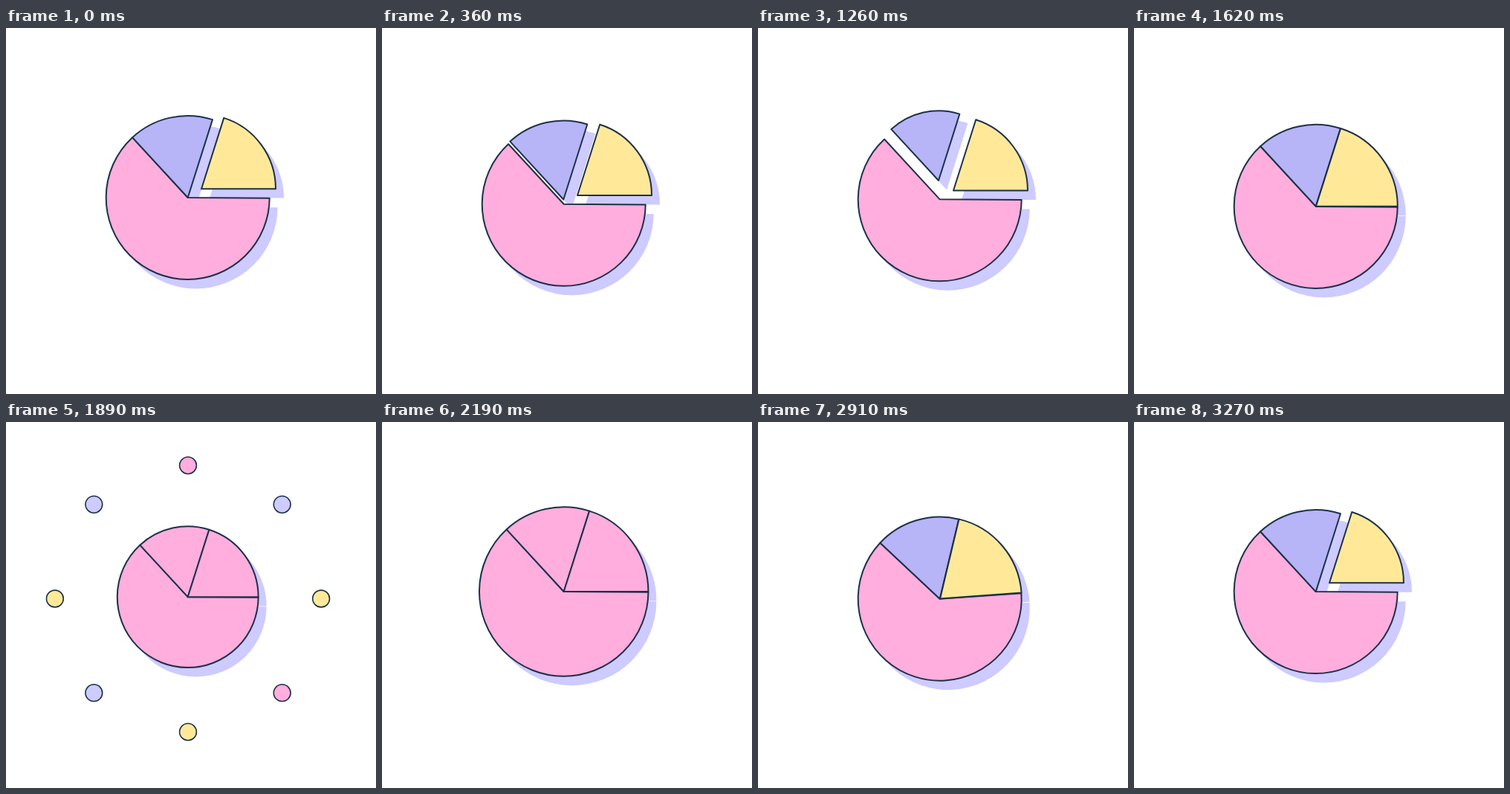
Write an HTML page with a canvas that moves like this. It is 498 px wide and 492 px high and loops after 3300 ms.

```html
<!DOCTYPE html>
<html lang="en">
<head>
<meta charset="utf-8">
<title>Pie chart</title>
<style>
  html, body { margin: 0; width: 100%; height: 100%; overflow: hidden; background: #fff; }
  canvas { display: block; }
</style>
</head>
<body>
<canvas id="stage" width="498" height="492"></canvas>
<script>
const ctx = document.getElementById('stage').getContext('2d');
const LOOP = 3300, STEP = 30, CX = 244.7, RADIUS = 110;
const INK = '#1d3148', SHADOW = '#cdcbff';
const PINK = [255, 174, 222], VIOLET = [183, 180, 248], YELLOW = [255, 233, 153];
const rgb = c => `rgb(${c.map(Math.round)})`;
const mix = (a, b, p) => a + (b - a) * p;
const rad = deg => deg * Math.PI / 180;
const smooth = p => (1 - Math.cos(Math.PI * p)) / 2;

// Eased value between [time, value] pairs
function track(t, keys) {
  if (t <= keys[0][0]) return keys[0][1];
  for (let i = 1; i < keys.length; i++) {
    const [t0, a] = keys[i - 1], [t1, b] = keys[i];
    if (t < t1) return mix(a, b, smooth((t - t0) / (t1 - t0)));
  }
  return keys[keys.length - 1][1];
}

const merge = [[1640, 0], [1900, 1], [2580, 1], [2830, 0]];
const size = [[1620, 1], [1860, 0.86], [2220, 1.037], [2430, 1]];
const swing = [[2190, 0], [2460, 23], [2880, -4.5], [3060, 0]];

// dx, dy and shrink apply when a slice is fully pulled out
const slices = [
  { from: 0.4, to: 227.3, color: PINK, dx: 0, dy: 0, shrink: 1, out: [[0, 0]] },
  { from: 227.3, to: 287.6, color: VIOLET, dx: -1.7, dy: -25.3, shrink: 0.853,
    out: [[240, 0], [600, 1], [1350, 1], [1640, 0]] },
  { from: 287.6, to: 360, color: YELLOW, dx: 18.3, dy: -11.8, shrink: 0.909,
    out: [[0, 1], [1350, 1], [1640, 0], [2880, 0], [3210, 1]] }
];

const dotColors = [YELLOW, PINK, YELLOW, [205, 203, 255], YELLOW, [205, 203, 255], PINK, [205, 203, 255]];

function drawDots(t) {
  const p = (t - 1650) / 450;
  if (p <= 0 || p >= 1) return;
  const dist = 229 * (1 - (1 - p) ** 2);
  const r = 11.4 * Math.min(1, (1 - p) / 0.35);
  ctx.lineWidth = 1.6;
  dotColors.forEach((color, i) => {
    const a = i * Math.PI / 4;
    ctx.beginPath();
    ctx.arc(245 + dist * Math.cos(a), 237.5 + dist * Math.sin(a), r, 0, 7);
    ctx.fillStyle = rgb(color);
    ctx.fill();
    ctx.stroke();
  });
}

function slicePath(s, t, cy, shiftX, shiftY) {
  const out = track(t, s.out), scale = track(t, size), turn = track(t, swing);
  const x = CX + s.dx * out * scale + shiftX;
  const y = cy + s.dy * out * scale + shiftY;
  ctx.beginPath();
  ctx.moveTo(x, y);
  ctx.arc(x, y, RADIUS * scale * mix(1, s.shrink, out), rad(s.from + turn), rad(s.to + turn));
  ctx.closePath();
}

function draw(t) {
  const cy = 234 - 6 * Math.cos(2 * Math.PI * t / 1100);
  const blend = track(t, merge);
  ctx.fillStyle = '#fff';
  ctx.fillRect(0, 0, 498, 492);
  ctx.strokeStyle = INK;
  ctx.lineJoin = 'round';
  drawDots(t);

  ctx.fillStyle = SHADOW;
  for (const s of slices) {
    slicePath(s, t, cy, 11, 12.4);
    ctx.fill();
  }
  ctx.lineWidth = 2;
  for (const s of slices) {
    slicePath(s, t, cy, 0, 0);
    ctx.fillStyle = rgb(s.color.map((c, i) => mix(c, PINK[i], blend)));
    ctx.fill();
    ctx.stroke();
  }
}

const start = performance.now();
function tick() {
  const t = (performance.now() - start) % LOOP;
  draw(Math.floor(t / STEP) * STEP);
  requestAnimationFrame(tick);
}
tick();
</script>
</body>
</html>
```
